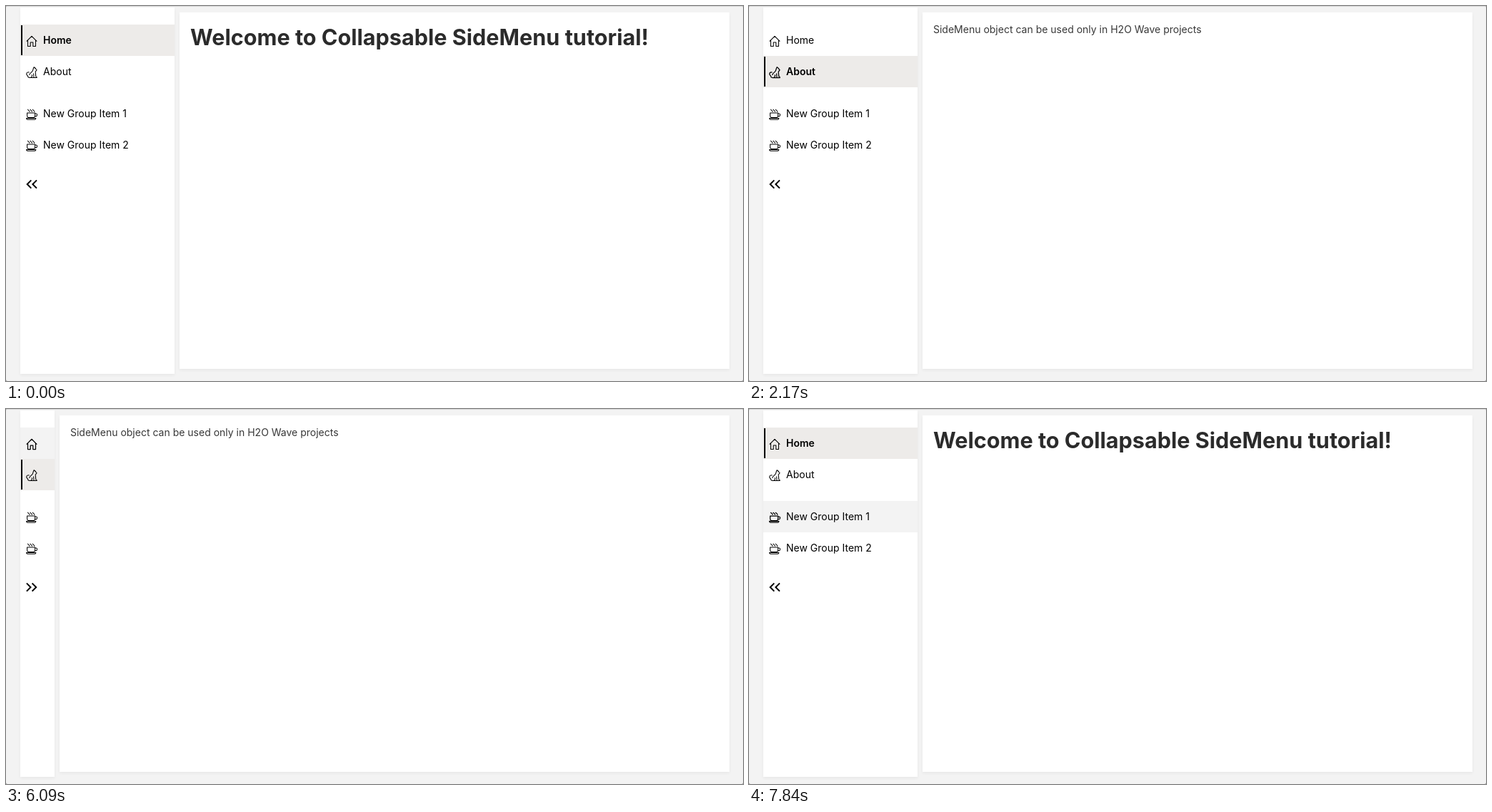
An HTML page that plays this animation: 1032 px wide and 526 px high, repeating every 8000 ms.

```html
<!DOCTYPE html>
<html lang="en">
<head>
<meta charset="utf-8">
<title>Collapsable side menu</title>
<style>
html, body { margin: 0; width: 100%; height: 100%; overflow: hidden; background: #8a8a8a; }
body { font: 14px Inter, "Liberation Sans", sans-serif; color: #000; }
#stage {
  position: absolute; inset: 0; overflow: hidden;
  background: #f3f3f3; border-radius: 2px;
}
#stage::before { content: ""; position: absolute; left: 0; right: 0; top: 0; height: 1px; background: #d6d6d6; }
#menu, #card { position: absolute; background: #fff; }
#menu { left: 20px; top: 2px; height: 514px; box-shadow: 0 2px 4px rgba(0,0,0,.05); }
#card { right: 19px; top: 9px; height: 500px; }
.item { position: absolute; left: 0; right: 0; height: 44px; line-height: 44px; white-space: nowrap; overflow: hidden; }
.item.hover { background: #f3f3f3; }
.item.on { background: #edebe9; font-weight: 600; }
.item.on::before { content: ""; position: absolute; left: 1px; top: 1px; width: 2px; height: 42px; background: #000; }
.item span { position: absolute; left: 32px; }
.item svg {
  position: absolute; left: 8px; top: 15px; width: 16px; height: 16px; overflow: visible;
  fill: none; stroke: #000; stroke-width: 1.05; stroke-linejoin: round;
}
.item.hover svg { stroke-width: 1.25; }
.item .arrow { stroke-width: 2; stroke-linejoin: miter; }
.item.hover .arrow { stroke-width: 2.3; }
#title, #note { position: absolute; left: 15px; top: 15px; margin: 0; white-space: nowrap; }
#title { font-size: 30.6px; font-weight: 700; line-height: 39px; color: #2b2b2b; }
#note { line-height: 18px; color: #383838; }
</style>
</head>
<body>
<div id="stage">
  <div id="menu"></div>
  <div id="card">
    <h1 id="title">Welcome to Collapsable SideMenu tutorial!</h1>
    <p id="note">SideMenu object can be used only in H2O Wave projects</p>
  </div>
</div>
<script>
const LOOP = 8000, FADE = 300;
const $ = id => document.getElementById(id);

const HOME = 'M.7 8.6 8 1.3 15.3 8.6M2.5 7V15.5H6.2V10H9.8V15.5H13.5V7';
const CAT = 'M4.6 8.2C3 7.2 .8 8.3 .7 10.2C.6 12.2 2.6 12.2 2.6 13.6C2.6 14.8 3.6 15.5 5 15.5H15.3' +
  'C15.4 14.2 14.5 14 13.8 13.9L13.2 7.3C13.4 6.3 14.5 6.1 15 4.7L13.9 3.5C13.3 2 12 1.6 11.2 .7L10.5 2.2' +
  'C9.8 3.8 9.8 5.3 8.8 6.6C7 8.6 5.2 9.4 4.6 12M10.6 9.5 11 15.3M6.6 15.2C8.8 14.6 8.8 12.6 8 11.4';
const CUP = 'M1.6 6H12.6V9.4C12.6 11.4 11.3 12.6 9.6 12.6H4.6C2.9 12.6 1.6 11.4 1.6 9.4Z' +
  'M12.6 7H14.2C16 7 16 10.6 14.2 10.6H12.4M.5 13.4H13.9C13.7 14.7 13.2 15.2 12.3 15.2H2.1C1.2 15.2 .7 14.7 .5 13.4Z' +
  'M2.4 .8C2.6 2.4 5 2.4 5.2 4.6M5.8 .8C6 2.4 8.4 2.4 8.6 4.6M9.2 .8C9.4 2.4 11.8 2.4 12 4.6';
const LEFT = 'M7.3 2.4 1.7 8 7.3 13.6M15 2.4 9.4 8 15 13.6';
const RIGHT = 'M.9 2.4 6.5 8 .9 13.6M8.6 2.4 14.2 8 8.6 13.6';

// Each track holds [time, value] steps.
const selected = [[0, 0], [2030, 1], [6160, 0]];
const page = [[0, 'title'], [2100, 'note'], [6230, 'title']];
const open = [[0, true], [4340, false], [7420, true]];
const hover = [
  [0, -1], [1120, 1], [2730, -1], [2940, 2], [3150, 3], [3290, 4], [4340, -1],
  [5460, 0], [6790, 2], [6860, 3], [7000, 4], [7770, 3], [7840, 2]
];
const lift = [[-FADE, 0], [440, 1], [960, 0], [4320, 1], [5350, 0]];

const stepAt = (track, t) => track.filter(s => s[0] <= t).pop();
const valueAt = (track, t) => stepAt(track, t)[1];

function liftAt(t) {
  const [start, to] = stepAt(lift, t);
  const left = (1 - Math.min(1, (t - start) / FADE)) ** 3;
  return to ? 1 - left : left;
}

const items = [
  [24, HOME, 'Home'], [68, CAT, 'About'],
  [127, CUP, 'New Group Item 1'], [171, CUP, 'New Group Item 2'], [225, LEFT, '']
].map(([top, icon, label]) => {
  const el = document.createElement('div');
  el.className = 'item';
  el.style.top = top + 'px';
  el.innerHTML = `<svg viewBox="0 0 16 16"><path d="${icon}"/></svg><span>${label}</span>`;
  $('menu').append(el);
  return el;
});
const arrow = items[4].querySelector('svg');
arrow.classList.add('arrow');

function draw(t) {
  const wide = valueAt(open, t), on = valueAt(selected, t), over = valueAt(hover, t);
  $('menu').style.width = (wide ? 216 : 48) + 'px';
  $('card').style.left = (wide ? 243 : 75) + 'px';
  items.forEach((el, i) => {
    el.classList.toggle('on', i === on);
    el.classList.toggle('hover', i === over);
    el.lastChild.style.display = wide ? '' : 'none';
  });
  arrow.firstChild.setAttribute('d', wide ? LEFT : RIGHT);

  const shown = valueAt(page, t);
  for (const id of ['title', 'note']) $(id).style.display = id === shown ? '' : 'none';

  const k = liftAt(t);
  $('card').style.boxShadow =
    `0 ${2 + 10 * k}px ${4 + 16 * k}px rgba(0,0,0,${0.05 + 0.1 * k})`;
}

function tick(now) {
  draw(now % LOOP);
  requestAnimationFrame(tick);
}
draw(0);
requestAnimationFrame(tick);
</script>
</body>
</html>
```
